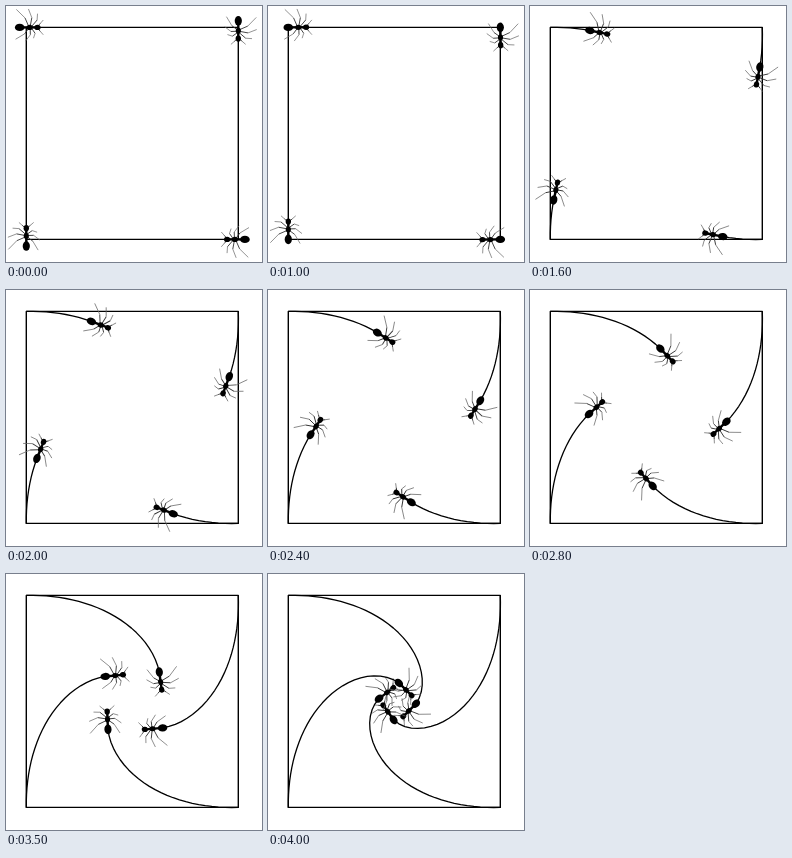
Recreate the animation shown at these times as an HTML page with a canvas. Size 256 by 256 pixels, loop 5 s.

```html
<!DOCTYPE html>
<html>
<head>
<meta charset="utf-8">
<title>Four ants chasing each other</title>
<style>
  html, body { margin: 0; overflow: hidden; background: #fff; }
  canvas { display: block; }
</style>
</head>
<body>
<canvas id="stage" width="256" height="256"></canvas>
<script>
const ctx = document.getElementById('stage').getContext('2d');
const HALF = 106, CENTER = [126.3, 127.4];
const STEP = 6.62, STEPS = 31;
const LAG = 2, DRIFT = { x: 2.5, y: 1 };
const LOOP = 5000, HOLD = 1000, TICK = 100;

const forward = ({ x, y, angle }, distance) => ({
  x: x + distance * Math.cos(angle),
  y: y + distance * Math.sin(angle),
  angle
});

// One ant per corner, heading along its side, one step short of the corner.
function startAnt(i) {
  const angle = i * Math.PI / 2;
  const corner = angle - 3 * Math.PI / 4;
  const radius = HALF * Math.SQRT2;
  return forward({ x: radius * Math.cos(corner), y: radius * Math.sin(corner), angle }, -STEP);
}

// All ants step forward, then each turns to a point just behind the next one.
function advance(ants) {
  const moved = ants.map(ant => forward(ant, STEP));
  return moved.map((ant, i) => {
    const target = forward(moved[(i + 1) % 4], -LAG);
    const angle = Math.atan2(target.y + DRIFT.y - ant.y, target.x + DRIFT.x - ant.x);
    return { ...ant, angle };
  });
}

const history = [[0, 1, 2, 3].map(startAnt)];
while (history.length <= STEPS) history.push(advance(history.at(-1)));

function line(points, width, color = '#000') {
  ctx.beginPath();
  points.forEach(p => ctx.lineTo(p.x, p.y));
  ctx.lineWidth = width;
  ctx.strokeStyle = color;
  ctx.stroke();
}

function blob(x, rx, ry) {
  ctx.beginPath();
  ctx.ellipse(x, 0, rx, ry, 0, 0, 2 * Math.PI);
  ctx.fill();
}

// A limb fans out at an angle from the body and bends forward at the knee.
function limb(rootX, side, angle, length, bend) {
  const hip = { x: rootX, y: side, angle: side * angle };
  const foot = forward(hip, length);
  const knee = forward(hip, length * 0.5);
  knee.x += bend;
  line([hip, knee], 0.9, '#333');
  line([knee, foot], 0.7, '#666');
}

function drawAnt({ x, y, angle }) {
  ctx.save();
  ctx.translate(x, y);
  ctx.rotate(angle);
  for (const side of [-1, 1]) {
    for (let i = 0; i < 3; i++) {
      const tilt = side > 0 ? 0.25 : 0;
      limb(9 + 1.5 * i, side, 2.2 + tilt - 0.53 * i, 19 - 2 * side - 3.5 * i, 2.5);
    }
    limb(18, side, 0.85, 8.5, 0);
  }
  line([{ x: 0, y: 0 }, { x: 17, y: 0 }], 2.4);
  ctx.fillStyle = '#000';
  blob(0, 4.8, 3.6);
  blob(10, 3, 2.6);
  blob(17.8, 3.1, 2.7);
  ctx.restore();
}

function draw(time) {
  const t = time % LOOP;
  const step = t < HOLD ? 0 : Math.min(STEPS, 1 + Math.floor((t - HOLD) / TICK));

  ctx.fillStyle = '#fff';
  ctx.fillRect(0, 0, 256, 256);
  ctx.save();
  ctx.translate(...CENTER);
  ctx.lineJoin = 'round';
  ctx.strokeStyle = '#000';
  ctx.lineWidth = 1.4;
  ctx.strokeRect(-HALF, -HALF, 2 * HALF, 2 * HALF);
  history[step].forEach((ant, i) => {
    line(history.slice(1, step + 1).map(ants => ants[i]), 1.3);
    drawAnt(ant);
  });
  ctx.restore();
}

const start = performance.now();
function tick() {
  draw(performance.now() - start);
  requestAnimationFrame(tick);
}
tick();
</script>
</body>
</html>
```
